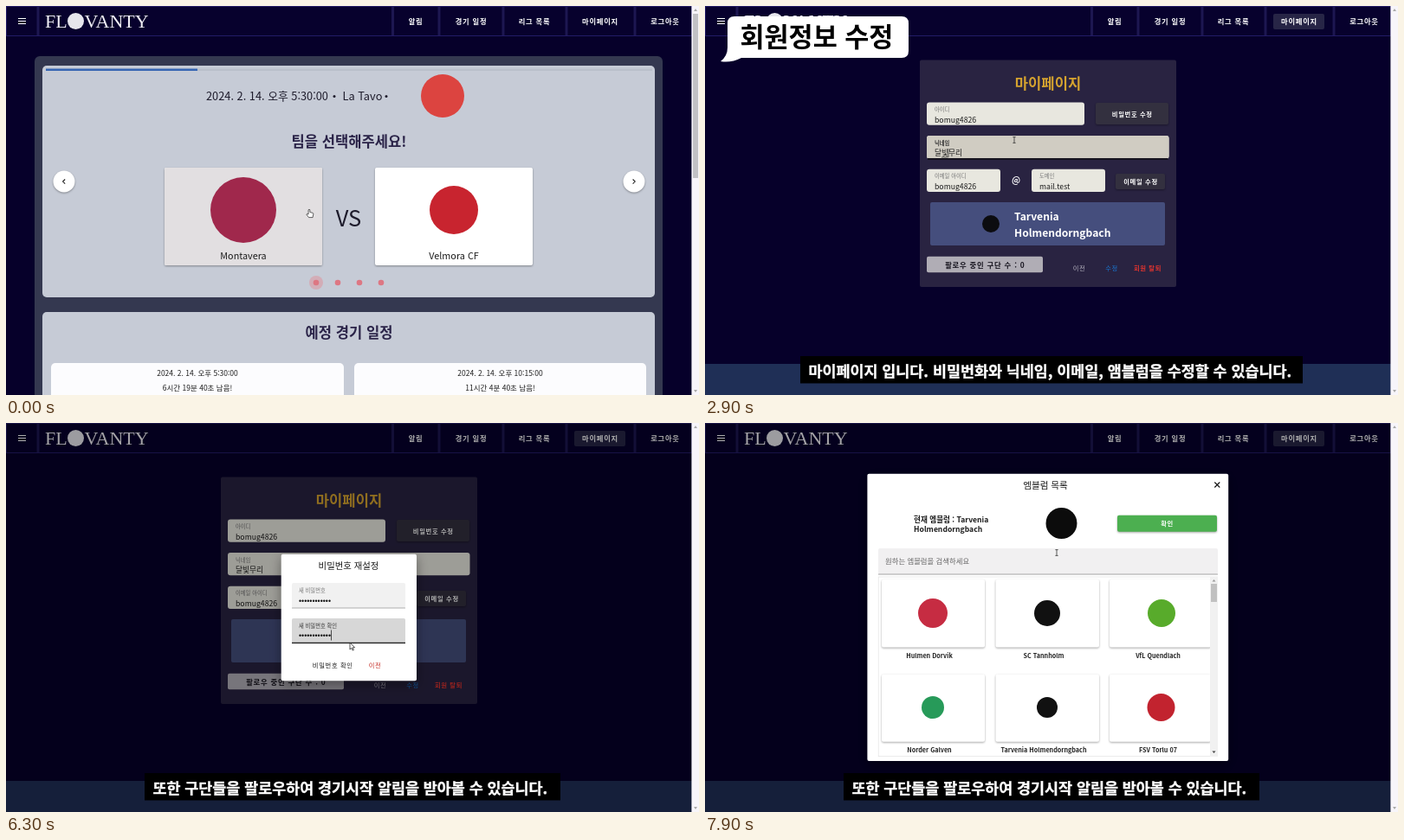
Animation of 800 by 450 pixels, one loop 8 s. Source, as an HTML page:

```html
<!DOCTYPE html>
<html lang="ko">
<head>
<meta charset="utf-8">
<title>마이페이지</title>
<style>
html, body { margin: 0; width: 100%; height: 100%; overflow: hidden; background: #06002a; }
svg { display: block; width: 800px; height: 450px; font-family: "Noto Sans CJK KR", "Noto Sans KR", "Noto Sans CJK JP", "Noto Sans CJK", sans-serif; }
.c { text-anchor: middle; }
.m { font-weight: 500; }
.b { font-weight: 700; }
.btn { font-size: 7.3px; letter-spacing: .0893em; text-anchor: middle; }
.nav { font-size: 8.3px; letter-spacing: .0893em; text-anchor: middle; font-weight: 700; fill: #fff; }
.h { font-size: 16.6px; font-weight: 700; text-anchor: middle; }
.lab { font-size: 6.3px; fill: #777; }
.val { font-size: 8.7px; fill: #1c1c1c; }
.big { font-size: 8.4px; fill: #666; }
.dots { font: 8.8px "Liberation Sans", Arial, sans-serif; fill: #111; }
.cap { font-size: 17.4px; font-weight: 700; fill: #fff; stroke: #fff; stroke-width: .35; }
.sh { filter: drop-shadow(0 1px 1px rgba(0,0,0,.35)); }
.dlg { filter: drop-shadow(0 4px 7px rgba(0,0,0,.4)); }

/* 1% = 80ms */
.an { animation: 8s step-end infinite; }
.fade { animation: 8s linear infinite; }
#home { animation-name: home; }
#hover { animation-name: hover; }
#pill { animation-name: pill; }
#cap1 { animation-name: cap1; }
#cap2 { animation-name: cap2; }
#bubble { animation-name: bubble; }
#nickOn, #compose { animation-name: nickOn; }
#nickA { animation-name: nickA; }
#nickB { animation-name: nickB; }
#nickC { animation-name: nickC; }
#pwd { animation-name: pwd; }
#alert { animation-name: alert; }
#ripple { animation-name: ripple; }
#emblems { animation-name: emblems; }
#big1 { animation-name: big1; }
#lab1 { animation-name: lab1; }
#on1 { animation-name: on1; }
#big2 { animation-name: big2; }
#lab2 { animation-name: lab2; }
#on2 { animation-name: on2; }
#dots1 { animation-name: dots1; }
#car1 { animation-name: car1; }
#dots2 { animation-name: dots2; }
#car2 { animation-name: car2; }
#cursor { animation: move 8s ease-in-out infinite; }
#hand { animation-name: hand; }
#beam { animation-name: beam; }
#arrow { animation-name: arrow; }

@keyframes home { 0% { opacity: 1 } 10%, to { opacity: 0 } }
@keyframes hover { 0% { opacity: 1 } 4%, to { opacity: 0 } }
@keyframes pill { 0% { opacity: 0 } 8.75%, to { opacity: 1 } }
@keyframes cap1 { 0% { opacity: 0 } 11.25% { opacity: 1 } 72.5%, to { opacity: 0 } }
@keyframes cap2 { 0% { opacity: 0 } 72.5%, to { opacity: 1 } }
@keyframes bubble { 0%, 15% { opacity: 0 } 21.5%, 70% { opacity: 1 } 76%, to { opacity: 0 } }
@keyframes nickOn { 0% { opacity: 0 } 25% { opacity: 1 } 42.5%, to { opacity: 0 } }
@keyframes nickA { 0% { opacity: 1 } 32%, to { opacity: 0 } }
@keyframes nickB { 0% { opacity: 0 } 32% { opacity: 1 } 34%, to { opacity: 0 } }
@keyframes nickC { 0% { opacity: 0 } 34%, to { opacity: 1 } }
@keyframes pwd { 0%, 42.5% { opacity: 0 } 44.5%, 89.5% { opacity: 1 } 91.5%, to { opacity: 0 } }
@keyframes alert { 0%, 82% { opacity: 0 } 84%, 88.5% { opacity: 1 } 90.5%, to { opacity: 0 } }
@keyframes ripple { 0%, 86% { opacity: 0 } 87.2%, 88.5% { opacity: 1 } 90%, to { opacity: 0 } }
@keyframes emblems { 0%, 93% { opacity: 0 } 95.5%, to { opacity: 1 } }
@keyframes big1 { 0% { opacity: 1 } 48%, to { opacity: 0 } }
@keyframes lab1 { 0% { opacity: 0 } 48%, to { opacity: 1 } }
@keyframes on1 { 0% { opacity: 0 } 48% { opacity: 1 } 66.5%, to { opacity: 0 } }
@keyframes big2 { 0% { opacity: 1 } 66.5%, to { opacity: 0 } }
@keyframes lab2 { 0% { opacity: 0 } 66.5%, to { opacity: 1 } }
@keyframes on2 { 0% { opacity: 0 } 66.5% { opacity: 1 } 82%, to { opacity: 0 } }
@keyframes dots1 { 0%, 55% { clip-path: inset(0 100% 0 0); animation-timing-function: steps(12) } 65.5%, to { clip-path: inset(0) } }
@keyframes car1 { 0%, 55% { transform: none; animation-timing-function: steps(12) } 65.5%, to { transform: translateX(37px) } }
@keyframes dots2 { 0%, 68.5% { clip-path: inset(0 100% 0 0); animation-timing-function: steps(12) } 77%, to { clip-path: inset(0) } }
@keyframes car2 { 0%, 68.5% { transform: none; animation-timing-function: steps(12) } 77%, to { transform: translateX(37px) } }
@keyframes move {
  0%, 2.5% { transform: translate(350px, 235px) }
  8%, 10% { transform: translate(690px, 19px) }
  16.25% { transform: translate(477px, 108px) }
  24%, 37% { transform: translate(357px, 155px) }
  41%, 43% { transform: translate(493px, 124px) }
  49%, 65% { transform: translate(407px, 200px) }
  66.5%, 77% { transform: translate(407px, 240px) }
  78.75% { transform: translate(397px, 254px) }
  81%, 82.5% { transform: translate(377px, 279px) }
  86%, 89% { transform: translate(370px, 247px) }
  92%, 93.5% { transform: translate(400px, 250px) }
  97%, to { transform: translate(406px, 150px) }
}
@keyframes hand { 0% { opacity: 1 } 4% { opacity: 0 } 7% { opacity: 1 } 11% { opacity: 0 } 40% { opacity: 1 } 45% { opacity: 0 } 80% { opacity: 1 } 94%, to { opacity: 0 } }
@keyframes beam { 0% { opacity: 0 } 22% { opacity: 1 } 38% { opacity: 0 } 46% { opacity: 1 } 77.5% { opacity: 0 } 96%, to { opacity: 1 } }
@keyframes arrow { 0% { opacity: 0 } 4% { opacity: 1 } 7% { opacity: 0 } 11% { opacity: 1 } 22% { opacity: 0 } 38% { opacity: 1 } 40% { opacity: 0 } 45% { opacity: 1 } 46% { opacity: 0 } 77.5% { opacity: 1 } 80% { opacity: 0 } 94% { opacity: 1 } 96%, to { opacity: 0 } }
</style>
</head>
<body>
<svg viewBox="0 0 800 450">
  <rect width="800" height="450" fill="#06002a"/>

  <!-- my page -->
  <rect y="414" width="792" height="36" fill="#1f2f56"/>
  <rect x="248" y="62.5" width="296" height="262.5" rx="2" fill="#292341"/>
  <text class="h" x="396" y="95.5" fill="#d5a32f">마이페이지</text>
  <g fill="#e8e7df">
    <rect x="256" y="111.5" width="182" height="26.3" rx="3"/>
    <rect x="256" y="150" width="279.5" height="26.3" rx="3"/>
    <rect x="256" y="188.7" width="85" height="26.3" rx="3"/>
    <rect x="377" y="188.7" width="85" height="26.3" rx="3"/>
  </g>
  <g class="lab">
    <text x="265" y="122">아이디</text>
    <text x="265" y="160.5">닉네임</text>
    <text x="265" y="199">이메일 아이디</text>
    <text x="386" y="199">도메인</text>
  </g>
  <g id="nickOn" class="an">
    <rect x="256" y="150" width="279.5" height="27" rx="3" fill="#d0ccc2"/>
    <path d="M257 177H534.5" stroke="#16131f" stroke-width="2"/>
    <text class="lab b" x="265" y="160.5" style="fill:#333">닉네임</text>
  </g>
  <g class="val">
    <text x="265" y="134.5">bomug4826</text>
    <text x="265" y="211.5">bomug4826</text>
    <text x="386" y="211.5">mail.test</text>
    <text id="nickA" class="an" x="265" y="173">달무리</text>
    <text id="nickB" class="an" x="265" y="173">달비무리</text>
    <text id="nickC" class="an" x="265" y="173">달빛무리</text>
  </g>
  <path id="compose" class="an" d="M273 175H280.5M281 165V175" stroke="#222" stroke-width=".7"/>
  <g fill="#33303f" class="sh">
    <rect x="451" y="112" width="84" height="25" rx="2"/>
    <rect x="474" y="194" width="57" height="18" rx="2"/>
  </g>
  <g class="btn b" fill="#fff">
    <text x="493.3" y="127.5">비밀번호 수정</text>
    <text x="503" y="206">이메일 수정</text>
  </g>
  <text class="c b" x="359" y="205" font-size="10" fill="#fff">@</text>
  <rect x="260" y="227" width="271" height="50" rx="2" fill="#454e7d"/>
  <circle cx="330" cy="252" r="10" fill="#0c0c10"/>
  <g class="b" font-size="12.1" fill="#fff">
    <text x="357" y="248">Tarvenia</text>
    <text x="357" y="266.5">Holmendorngbach</text>
  </g>
  <rect x="256" y="289.7" width="134" height="18.5" rx="2" fill="#b0adb5"/>
  <text class="btn b" x="323.3" y="302.5" style="font-size:8.4px" fill="#17151f">팔로우 중인 구단 수 : 0</text>
  <g class="btn m">
    <text x="432" y="306" fill="#b3b0bd">이전</text>
    <text x="469.5" y="306" fill="#1976d2">수정</text>
    <text class="b" x="511" y="306" fill="#e0342f">회원 탈퇴</text>
  </g>

  <!-- home -->
  <g id="home" class="an">
    <rect width="792" height="450" fill="#06002a"/>
    <rect x="33" y="58" width="725" height="400" rx="6" fill="#343850"/>
    <rect x="42" y="69" width="707" height="268" rx="5" fill="#c6cbd6"/>
    <rect x="46" y="72.5" width="700" height="2.5" fill="#b9bfca"/>
    <rect x="46" y="72.5" width="175" height="2.5" fill="#3766b3"/>
    <g font-size="12.8" fill="#1d1b2b">
      <text x="231" y="108.5">2024. 2. 14. 오후 5:30:00</text>
      <text x="388.5" y="108.5">La Tavo</text>
    </g>
    <circle cx="379" cy="104.5" r="1.5" fill="#1d1b2b"/>
    <circle cx="439" cy="104.5" r="1.5" fill="#1d1b2b"/>
    <circle cx="504" cy="104" r="25" fill="#dc4440"/>
    <text class="h" x="396" y="163" fill="#2a2348">팀을 선택해주세요!</text>
    <g class="sh">
      <rect x="183" y="187" width="182" height="113" rx="2" fill="#fff"/>
      <rect x="426" y="187" width="182" height="113" rx="2" fill="#fff"/>
    </g>
    <rect id="hover" class="an" x="183" y="187" width="182" height="113" rx="2" fill="#e2dfe1"/>
    <circle cx="274" cy="236" r="38" fill="#a0284c"/>
    <circle cx="517" cy="236" r="28" fill="#c8242f"/>
    <g class="c" font-size="10.8" fill="#1c1c1c">
      <text x="274" y="292.5">Montavera</text>
      <text x="517" y="292.5">Velmora CF</text>
    </g>
    <text class="c" x="395.5" y="255" font-size="25.5" fill="#1d1b2b">VS</text>
    <g class="sh" fill="#fff">
      <circle cx="67" cy="203" r="12.5"/>
      <circle cx="725" cy="203" r="12.5"/>
    </g>
    <path d="M68.2 200.5l-2.6 2.6 2.6 2.6M723.6 200.5l2.6 2.6-2.6 2.6" fill="none" stroke="#222" stroke-width="1.1"/>
    <circle cx="358" cy="320" r="8" fill="#d9a0aa" opacity=".7"/>
    <g fill="#dd7783">
      <circle cx="358" cy="320" r="3.3"/>
      <circle cx="383" cy="320" r="3.3"/>
      <circle cx="408" cy="320" r="3.3"/>
      <circle cx="433" cy="320" r="3.3"/>
    </g>
    <rect x="42" y="354" width="707" height="110" rx="5" fill="#c6cbd6"/>
    <text class="h" x="396" y="384" fill="#2a2348">예정 경기 일정</text>
    <g fill="#fcfcfe">
      <rect x="52" y="413" width="338" height="60" rx="5"/>
      <rect x="402" y="413" width="337" height="60" rx="5"/>
    </g>
    <g class="c m" font-size="8.5" fill="#1c1c1c">
      <text x="221" y="428">2024. 2. 14. 오후 5:30:00</text>
      <text x="221" y="444.5">6시간 19분 40초 남음!</text>
      <text x="570.5" y="428">2024. 2. 14. 오후 10:15:00</text>
      <text x="570.5" y="444.5">11시간 4분 40초 남음!</text>
    </g>
  </g>

  <!-- header -->
  <rect x=".5" y=".5" width="791" height="34" fill="#07012d" stroke="#221b66"/>
  <path d="M37 1V34M446.5 1V34M500 1V34M574 1V34M647 1V34M726 1V34" stroke="#1d1751" stroke-width="3"/>
  <path d="M14 14.5H23M14 17.5H23M14 20.5H23" stroke="#fff" stroke-width="1.2"/>
  <g font-family="Liberation Serif, Times New Roman, serif" font-size="22" fill="#f0eff4">
    <text x="45" y="25">FL</text>
    <text x="90.5" y="25">VANTY</text>
  </g>
  <circle cx="80.5" cy="17.5" r="9.5" fill="#e6e6ec"/>
  <rect id="pill" class="an" x="656" y="9" width="59" height="18" rx="2" fill="#272546"/>
  <g class="nav">
    <text x="473" y="21">알림</text>
    <text x="537" y="21">경기 일정</text>
    <text x="610" y="21">리그 목록</text>
    <text x="686" y="21">마이페이지</text>
    <text x="761" y="21">로그아웃</text>
  </g>

  <!-- password dialog -->
  <g id="pwd" class="fade">
    <rect width="792" height="450" opacity=".32"/>
    <rect class="dlg" x="317.7" y="151.7" width="156.3" height="146.5" rx="2" fill="#fff"/>
    <text class="c" x="395.5" y="168.5" font-size="10.4" fill="#1c1c1c">비밀번호 재설정</text>
    <g fill="#f1f1f1">
      <rect x="330" y="185" width="131" height="29" rx="2"/>
      <rect x="330" y="226" width="131" height="29" rx="2"/>
    </g>
    <path d="M330 214H461M330 254.8H461" stroke="#9a9a9a" stroke-width=".8"/>
    <text id="big1" class="big an" x="338" y="202.5">새 비밀번호</text>
    <text id="big2" class="big an" x="338" y="243">새 비밀번호 확인</text>
    <text id="lab1" class="lab an" x="338" y="196">새 비밀번호</text>
    <text id="lab2" class="lab an" x="338" y="236.5">새 비밀번호 확인</text>
    <g id="on1" class="an">
      <rect x="330" y="185" width="131" height="29" rx="2" fill="#d7d7d7"/>
      <path d="M330 213.7H461" stroke="#222" stroke-width="1.4"/>
      <text class="lab m" x="338" y="196" style="fill:#333">새 비밀번호</text>
      <path id="car1" class="fade" d="M338.6 199V211" stroke="#111" stroke-width=".8"/>
    </g>
    <g id="on2" class="an">
      <rect x="330" y="226" width="131" height="29" rx="2" fill="#d7d7d7"/>
      <path d="M330 254.4H461" stroke="#222" stroke-width="1.4"/>
      <text class="lab m" x="338" y="236.5" style="fill:#333">새 비밀번호 확인</text>
      <path id="car2" class="fade" d="M338.6 239.5V251.5" stroke="#111" stroke-width=".8"/>
    </g>
    <text id="dots1" class="dots fade" x="338" y="208.5">••••••••••••</text>
    <text id="dots2" class="dots fade" x="338" y="249">••••••••••••</text>
    <g class="btn m">
      <text x="377.3" y="282.5" fill="#1c1c1c">비밀번호 확인</text>
      <text x="426" y="282.5" fill="#c62f28">이전</text>
    </g>
  </g>

  <!-- confirmation -->
  <g id="alert" class="fade">
    <rect width="792" height="450" opacity=".32"/>
    <rect class="dlg" x="344" y="192" width="104" height="66" rx="2" fill="#fff"/>
    <g font-size="8.6" fill="#1c1c1c">
      <text x="356" y="210">비밀번호 수정이 완료</text>
      <text x="356" y="222">되었습니다.</text>
    </g>
    <rect id="ripple" class="fade" x="355" y="234.5" width="25" height="20" rx="9" fill="#bdbdbd"/>
    <text class="btn m" x="365" y="247" fill="#1c1c1c">확인</text>
  </g>

  <!-- emblem list -->
  <g id="emblems" class="fade">
    <rect width="792" height="450" opacity=".32"/>
    <rect class="dlg" x="187.4" y="58.7" width="416.8" height="332.3" rx="2" fill="#fff"/>
    <text class="c" x="393" y="75.5" font-size="10.6" fill="#1c1c1c">엠블럼 목록</text>
    <path d="M588.3 68.5l6 6m0-6l-6 6" stroke="#111" stroke-width="1.1"/>
    <g class="b" font-size="8.6" fill="#1c1c1c">
      <text x="241" y="115">현재 엠블럼 : Tarvenia</text>
      <text x="241" y="125.5">Holmendorngbach</text>
    </g>
    <circle cx="411.5" cy="116" r="18" fill="#0c0c0c"/>
    <rect class="sh" x="476" y="106.7" width="115" height="19" rx="2" fill="#4caf50"/>
    <text class="btn b" x="533.5" y="119" fill="#fff">확인</text>
    <rect x="200" y="145" width="392" height="30" rx="2" fill="#f1f0f1"/>
    <path d="M200 175H592" stroke="#999" stroke-width=".9"/>
    <text class="big" x="208" y="162.5">원하는 엠블럼을 검색하세요</text>
    <path d="M200 178H592M200 385.5H592M200.3 178V386" stroke="#e2e2e2" stroke-width=".7"/>
    <g class="sh" fill="#fff">
      <rect x="204" y="181" width="119" height="78.5" rx="2"/>
      <rect x="335.5" y="181" width="119.5" height="78.5" rx="2"/>
      <rect x="467" y="181" width="117" height="78.5" rx="2"/>
      <rect x="204" y="290.7" width="119" height="78" rx="2"/>
      <rect x="335.5" y="290.7" width="119.5" height="78" rx="2"/>
      <rect x="467" y="290.7" width="117" height="78" rx="2"/>
    </g>
    <circle cx="263" cy="220" r="17" fill="#c62c42"/>
    <circle cx="395" cy="220" r="15" fill="#111"/>
    <circle cx="527" cy="220" r="16" fill="#58ab2b"/>
    <circle cx="263" cy="329" r="13" fill="#279a59"/>
    <circle cx="395" cy="329" r="12" fill="#111"/>
    <circle cx="526.5" cy="329" r="16" fill="#c2232f"/>
    <g class="c b" font-size="7.2" fill="#222">
      <text x="259" y="271.5">Hulmen Dorvik</text>
      <text x="391" y="271.5">SC Tannholm</text>
      <text x="523" y="271.5">VfL Quendlach</text>
      <text x="259" y="381">Norder Galven</text>
      <text x="391" y="381">Tarvenia Holmendorngbach</text>
      <text x="523" y="381">FSV Torlu 07</text>
    </g>
    <rect x="583" y="178" width="9" height="208" fill="#f1f1f1"/>
    <rect x="584" y="186" width="7" height="21" fill="#c1c1c1"/>
    <path d="M585.5 183.5l2-2.5 2 2.5z" fill="#999"/>
    <path d="M585.5 379.5l2 2.5 2-2.5z" fill="#444"/>
  </g>

  <!-- page scrollbar -->
  <rect x="791.4" width="9" height="450" fill="#f7f5fa"/>
  <path d="M794 6l2-3 2 3zM794 444l2 3 2-3z" fill="#aaa"/>
  <rect class="an" style="animation-name:home" x="793" y="9" width="6" height="190" fill="#c1c1c4"/>

  <!-- pointer -->
  <g id="cursor">
    <path id="arrow" class="an" d="M0 0V8l1.9-1.7 1.3 2.8 1.2-.6-1.3-2.7h2.5z" fill="#fff" stroke="#111" stroke-width=".7"/>
    <path id="hand" class="an" d="M-.9 .8Q0-.6 .9 .8V3.6L4 4.3Q5 4.6 4.8 5.8L4.1 9.6H-.5L-3.2 6Q-2.8 4.8-.9 6z" fill="#fff" stroke="#222" stroke-width=".7"/>
    <path id="beam" class="an" d="M-1.6-3.4H1.6M0-3.4V3.4M-1.6 3.4H1.6" fill="none" stroke="#333" stroke-width=".8"/>
  </g>

  <!-- video titles -->
  <g id="bubble" class="fade">
    <path d="M34 12H227q8 0 8 8V52q0 8-8 8H42Q30 66 18 64Q26 58 26 48V20q0-8 8-8z" fill="#fff"/>
    <text class="b" x="40.5" y="47" font-size="30.5">회원정보 수정</text>
  </g>
  <g id="cap1" class="an">
    <rect x="110" y="405" width="580" height="31.5"/>
    <text class="cap" x="119.5" y="428.5">마이페이지 입니다. 비밀번화와 닉네임, 이메일, 앰블럼을 수정할 수 있습니다.</text>
  </g>
  <g id="cap2" class="an">
    <rect x="160" y="405" width="480" height="31.5"/>
    <text class="cap" x="169.5" y="428.5">또한 구단들을 팔로우하여 경기시작 알림을 받아볼 수 있습니다.</text>
  </g>
</svg>
</body>
</html>
```
